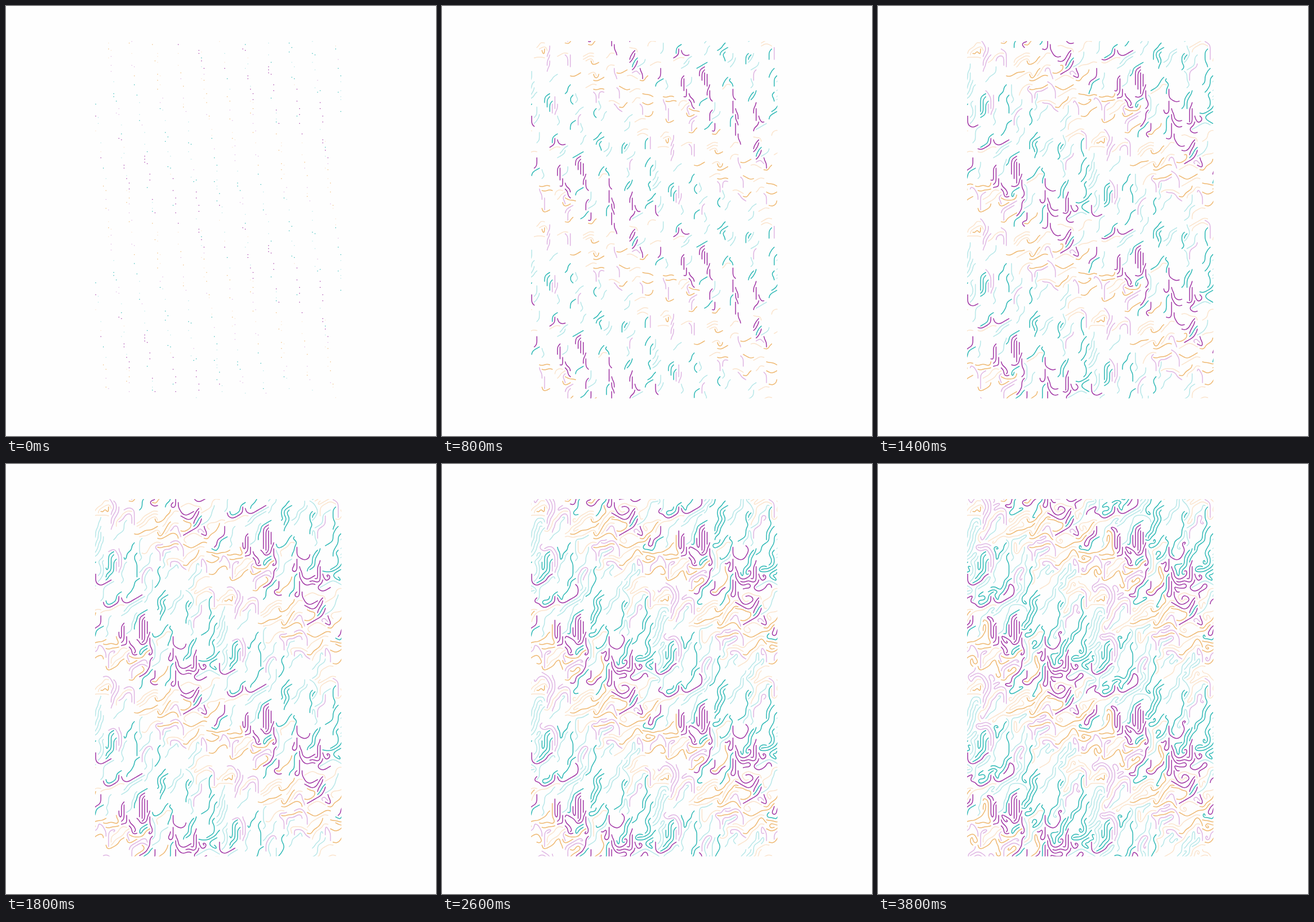
An HTML page with a canvas for the animation above (5200 ms loop, 748 by 748 pixels).

```html
<!DOCTYPE html>
<html lang="en">
<head>
<meta charset="utf-8">
<title>Growing lines</title>
<style>
  html, body { margin: 0; width: 100%; height: 100%; overflow: hidden; background: #fefefe; }
  canvas { display: block; width: 100vw; height: 100vh; }
</style>
</head>
<body>
<canvas width="748" height="748"></canvas>
<script>
const canvas = document.querySelector('canvas');
const ctx = canvas.getContext('2d');

const LOOP = 5200, TICK = 200, STEPS = 19;
const LEFT = 156, TOP = 61.8;

// Triangular lattice: columns i, half rows h, vertical edges.
const HALF = 2.5915, EDGE = 2 * HALF, COL = EDGE * Math.sqrt(3) / 2;
const DIRS = [[1, -1], [0, -2], [-1, -1], [-1, 1], [0, 2], [1, 1]];

// The pattern repeats under (48, 60) and (0, 120) in lattice units.
const CELL_I = 48, CELL_H = 60;
const mod = (a, n) => ((a % n) + n) % n;

// Start direction, then the mean heading (degrees, counterclockwise),
// the turn per step and how strongly the line follows the ripples.
const KINDS = {
  teal:       { color: '#2fb9b6', start: 3, heading: 266, turn: 0,  ripple: 0.9 },
  paleTeal:   { color: '#b6e7e8', start: 0, heading: 86,  turn: 0,  ripple: 0.9 },
  purple:     { color: '#a136a5', start: 4, heading: 268, turn: 20, ripple: 0.15 },
  palePurple: { color: '#dfb5e3', start: 1, heading: 70,  turn: 20, ripple: 0.15 },
  orange:     { color: '#efb973', start: 5, heading: 24,  turn: 0,  ripple: 0.9 },
  paleOrange: { color: '#fbe4cd', start: 2, heading: 204, turn: 0,  ripple: 0.9 }
};

let seed = 20;
function random() {
  seed = (seed * 1664525 + 1013904223) % 4294967296;
  return seed / 4294967296;
}

function siteKey(i, h) {
  const k = Math.floor(i / CELL_I);
  return (i - k * CELL_I) * 120 + mod(h - k * CELL_H, 120);
}

// Diagonal bands decide which kinds of line start where.
function pickKind(i, h) {
  const band = mod(h - i * CELL_H / CELL_I - 20, 120) / 120;
  const r = random();
  if (band < 0.25 || band > 0.9) return r < 0.5 ? 'teal' : r < 0.86 ? 'paleTeal' : 'palePurple';
  if (band < 0.57) return r < 0.56 ? 'purple' : r < 0.68 ? 'teal' : r < 0.82 ? 'paleTeal' : 'paleOrange';
  return r < 0.44 ? 'orange' : r < 0.78 ? 'paleOrange' : 'palePurple';
}

function ripple(i, h) {
  const u = 2 * Math.PI * i / 96, v = 2 * Math.PI * h / 120;
  return 30 * Math.sin(9 * u + 5 * v) + 26 * Math.sin(3 * u - 13 * v);
}

// Seeds lie on one slanted chain that winds through the whole cell.
function makeLines() {
  const taken = new Set(), lines = [];
  for (let s = 0; s < 660; s += 1 + Math.floor(random() * 7.5)) {
    const h = (50 + s) % 120;
    let i = Math.floor(s / 13.75);
    if (mod(i + h, 2)) i++;
    const key = siteKey(i, h);
    if (taken.has(key)) continue;
    taken.add(key);
    const kind = KINDS[pickKind(i, h)];
    lines.push({ kind, sites: [[i, h]], dir: kind.start, lagX: 0, lagY: 0, done: false });
  }
  for (let step = 0; step < STEPS; step++) {
    for (const line of lines) if (!line.done) grow(line, step, taken);
  }
  return lines;
}

// Move to the free neighbour closest to the ideal continuous path.
function grow(line, step, taken) {
  const { kind, sites } = line;
  const [i, h] = sites[sites.length - 1];
  const degrees = step === 0
    ? 30 + 60 * kind.start
    : kind.heading + kind.turn * (step - 1) + kind.ripple * ripple(i, h);
  const angle = degrees * Math.PI / 180;
  const aimX = line.lagX + EDGE * Math.cos(angle);
  const aimY = line.lagY - EDGE * Math.sin(angle);
  const closest = turns => {
    let best = null;
    for (const turn of turns) {
      const dir = mod(line.dir + turn, 6);
      const [di, dh] = DIRS[dir];
      const key = siteKey(i + di, h + dh);
      if (taken.has(key)) continue;
      const dx = aimX - di * COL, dy = aimY - dh * HALF;
      const miss = Math.hypot(dx, dy);
      if (!best || miss < best.miss) best = { dir, key, dx, dy, miss, site: [i + di, h + dh] };
    }
    return best;
  };
  const best = closest([0, 1, -1]) || closest([2, -2]);
  if (!best) {
    line.done = true;
    return;
  }
  taken.add(best.key);
  sites.push(best.site);
  line.dir = best.dir;
  line.lagX = best.dx * 0.7;
  line.lagY = best.dy * 0.7;
}

function smoothPath(sites) {
  const raw = sites.map(([i, h]) => [i * COL, h * HALF]);
  const last = raw.length - 1;
  const pts = raw.map((p, n) => n === 0 || n === last
    ? p
    : p.map((c, axis) => (raw[n - 1][axis] + 2 * c + raw[n + 1][axis]) / 4));
  const path = new Path2D();
  path.moveTo(...pts[0]);
  for (let n = 1; n < last; n++) {
    const [x, y] = pts[n], [nextX, nextY] = pts[n + 1];
    path.quadraticCurveTo(x, y, (x + nextX) / 2, (y + nextY) / 2);
  }
  path.lineTo(...pts[last]);
  return path;
}

const lines = makeLines();

function draw(step) {
  ctx.fillStyle = '#fefefe';
  ctx.fillRect(0, 0, 748, 748);
  ctx.save();
  ctx.beginPath();
  ctx.rect(155, 61, 428.5, 621.5);
  ctx.clip();
  ctx.lineWidth = 1.5;
  ctx.lineCap = ctx.lineJoin = 'round';
  const paths = lines.map(line => smoothPath(line.sites.slice(0, step + 1)));
  for (let a = -1; a <= 2; a++) {
    for (let b = -4; b <= 5; b++) {
      if (mod(a + b, 2)) continue;
      ctx.save();
      ctx.translate(LEFT + a * CELL_I * COL, TOP + b * CELL_H * HALF);
      lines.forEach((line, n) => {
        ctx.strokeStyle = line.kind.color;
        ctx.stroke(paths[n]);
      });
      ctx.restore();
    }
  }
  ctx.restore();
}

let shown = -1;
function frame() {
  const step = Math.min(STEPS, Math.floor(performance.now() % LOOP / TICK));
  if (step !== shown) draw(shown = step);
  requestAnimationFrame(frame);
}
frame();
</script>
</body>
</html>
```
